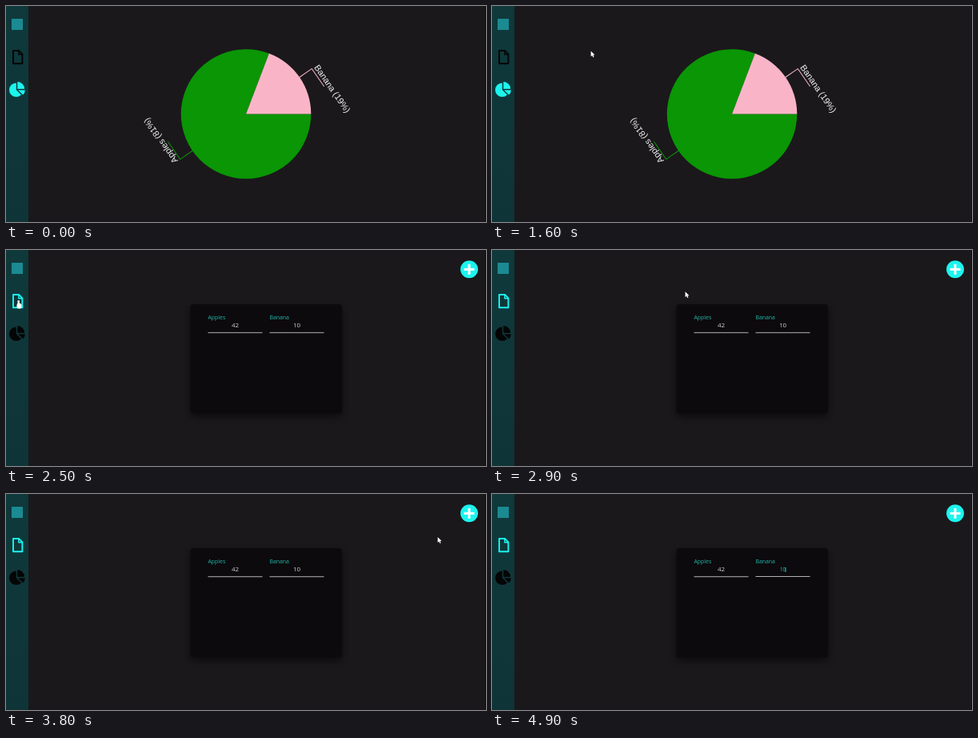
An HTML page with a canvas for the animation above (5000 ms loop, 600x271 px).

```html
<!DOCTYPE html>
<html lang="en">
<head>
<meta charset="utf-8">
<title>Fruit chart</title>
<style>
html, body { margin: 0; width: 100%; height: 100%; overflow: hidden; background: #1a181b; }
canvas { display: block; width: 600px; height: 271px; }
</style>
</head>
<body>
<canvas id="stage"></canvas>
<script>
const W = 600, H = 271, LOOP = 5000, STEP = 100, TURN = Math.PI * 2;
const CYAN = '#1cf4ee', BLACK = '#050506', TEAL = '#22b9aa', GREEN = '#0a9605', PINK = '#f9b5c7';
const SANS = '"Open Sans", "Noto Sans", sans-serif';
const ARIAL = '"Liberation Sans", Arial, sans-serif';
const DOC = { x: 16, y: 64 };
const PLUS = { x: 579, y: 24.3, r: 11 };
const canvas = document.getElementById('stage');
const c = canvas.getContext('2d');
const dpr = window.devicePixelRatio || 1;
canvas.width = W * dpr;
canvas.height = H * dpr;

// Places where the pointer rests; it glides between them
const STOPS = [
  { t: 1100, x: 274, y: 46 },
  { t: 2000, ...DOC },
  { t: 2600, ...DOC },
  { t: 3300, x: 589, y: 34 },
  { t: 3600, x: 588, y: 40 },
  { t: 4300, x: 344, y: 110 },
  { t: 4500, x: 366, y: 93 }
];

const clamp = v => Math.max(0, Math.min(1, v));
const ease = k => k * k * (3 - 2 * k);
const mix = (a, b, k) => a + (b - a) * k;

function pointerAt(t) {
  const next = STOPS.findIndex(s => s.t > t);
  if (next < 0) return STOPS[STOPS.length - 1];
  const a = STOPS[next - 1], b = STOPS[next];
  const k = ease((t - a.t) / (b.t - a.t));
  return { x: mix(a.x, b.x, k), y: mix(a.y, b.y, k) };
}

function rect(x, y, w, h, color, r = 0) {
  c.fillStyle = color;
  c.beginPath();
  c.roundRect(x, y, w, h, r);
  c.fill();
}

function sector(x, y, r, from, to, color) {
  c.fillStyle = color;
  c.beginPath();
  c.moveTo(x, y);
  c.arc(x, y, r, from, to);
  c.fill();
}

function stroke(path, color, width) {
  c.strokeStyle = color;
  c.lineWidth = width;
  c.stroke(new Path2D(path));
}

function text(str, x, y, size, color, align = 'left', family = SANS) {
  c.font = size + 'px ' + family;
  c.textAlign = align;
  c.fillStyle = color;
  c.fillText(str, x, y);
}

function docIcon(color) {
  c.lineJoin = 'round';
  stroke('M9 56h7l4.4 4.4v11.8h-11.4z', color, 1.9);
  stroke('M15.8 56v4.8h4.6', color, 1.4);
  c.lineJoin = 'miter';
}

function pieIcon(color) {
  const eighth = TURN / 8;
  sector(12.8, 105.2, 8.8, eighth, 6 * eighth, color);
  sector(14.3, 103.9, 8.8, -2 * eighth, 0, color);
  sector(15, 105.4, 8.8, 0, eighth, color);
}

function sidebar(formOpen) {
  const g = c.createLinearGradient(0, 0, 0, H);
  g.addColorStop(0, '#0f393b');
  g.addColorStop(1, '#0f3438');
  rect(0, 0, 28, H, g);
  rect(7, 16, 14, 14, '#1b8a92');
  docIcon(formOpen ? CYAN : BLACK);
  pieIcon(formOpen ? BLACK : CYAN);
}

function chartLabel(str, angle, color) {
  c.save();
  c.translate(300, 135.5);
  c.rotate(angle);
  stroke('M81 0h19v27', color, 1);
  c.translate(103, 0);
  c.rotate(TURN / 4);
  text(str, 0, 0, 11, '#f4f4f4', 'left', ARIAL);
  c.restore();
}

function chart() {
  const share = 10 / 52 * TURN;
  sector(300, 135.5, 81.3, 0, TURN - share, GREEN);
  sector(300, 135.5, 81.3, -share, 0, PINK);
  chartLabel('Banana (19%)', -share / 2, PINK);
  chartLabel('Apples (81%)', (TURN - share) / 2, GREEN);
}

function field(name, value, x, focus) {
  text(name, x, 87.1, 6.9, TEAL);
  text(value, x + 34, 97.1, mix(8, 6.2, focus), focus ? '#25d0c2' : '#d2d2d3', 'center');
  rect(x, 103.3 - focus * 0.3, 68, 1, '#b4b4b5');
}

function form(t) {
  c.save();
  c.shadowColor = 'rgba(0,0,0,.6)';
  c.shadowBlur = 11 * dpr;
  c.shadowOffsetY = 4 * dpr;
  rect(230.5, 68, 189.5, 137, '#0c0a0d', 4);
  c.restore();

  field('Apples', '42', 252.5, 0);
  field('Banana', '10', 329.5, clamp((t - 4600) / 300));
  if (t >= 4700) rect(366.5, 92, 1, 6, TEAL);

  sector(PLUS.x, PLUS.y, PLUS.r, 0, TURN, CYAN);
  rect(PLUS.x - 6.5, PLUS.y - 1.5, 13, 3, '#fff');
  rect(PLUS.x - 1.5, PLUS.y - 6.5, 3, 13, '#fff');
}

function hand() {
  rect(-1.5, -1, 2.4, 7, '#fff', 1.2);
  rect(-2.5, 3, 6, 6.5, '#fff', 2);
}

function arrow() {
  const path = 'M0 0v7l1.6-1.4 1.2 2.4 1.2-.6-1.1-2.3 2.1-.1z';
  stroke(path, '#101012', 1);
  c.fillStyle = '#fff';
  c.fill(new Path2D(path));
}

function pointer(t) {
  if (t < 1100 || t >= 4700) return;
  const { x, y } = pointerAt(t);
  c.save();
  c.translate(x, y);
  if (t >= 4500) rect(0.5, -2, 1, 8, '#e8e8e8');
  else if (x < 23) hand();
  else arrow();
  c.restore();
}

function draw(now) {
  const t = Math.floor((now % LOOP) / STEP) * STEP;
  const formOpen = t >= 2500;
  c.setTransform(dpr, 0, 0, dpr, 0, 0);
  rect(0, 0, W, H, '#1a181b');
  rect(599, 0, 1, H, '#0d0c0e');
  sidebar(formOpen);
  if (formOpen) form(t);
  else chart();
  pointer(t);
}

const start = performance.now();
function tick() {
  draw(performance.now() - start);
  requestAnimationFrame(tick);
}
tick();
</script>
</body>
</html>
```
